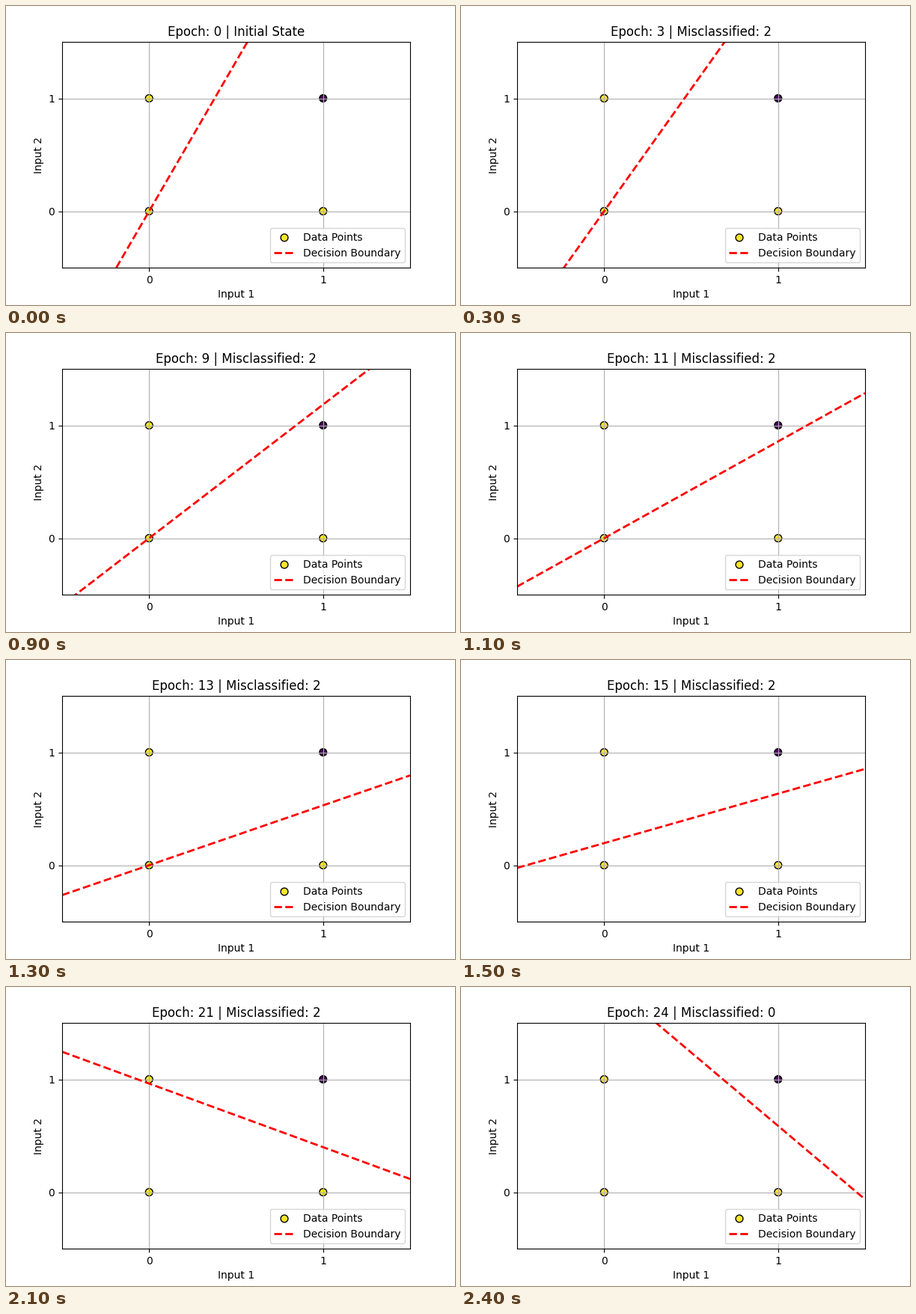
A matplotlib script for the animation above (3000 ms loop, 600 by 400 pixels).

```python
import numpy as np
import matplotlib.pyplot as plt
from matplotlib.animation import FuncAnimation

EPOCHS, HOLD = 24, 5
RATE = 0.1

# NAND truth table
X = np.array([[0, 0], [0, 1], [1, 0], [1, 1]])
Y = np.array([1, 1, 1, 0])


def train():
    """Perceptron learning: (weights, bias, errors) after every epoch."""
    w, b = np.random.RandomState(1).randn(2), 0.0
    history = [(w.copy(), b, None)]
    for _ in range(EPOCHS):
        errors = 0
        for x, target in zip(X, Y):
            delta = target - int(w @ x + b >= 0)
            if delta:
                w += RATE * delta * x
                b += RATE * delta
                errors += 1
        history.append((w.copy(), b, errors))
    return history


history = train()
span = np.array([-0.5, 1.5])

fig, ax = plt.subplots(figsize=(6, 4), dpi=100)
fig.subplots_adjust(left=0.125, right=0.9, bottom=0.125, top=0.88)
ax.scatter(X[:, 0], X[:, 1], c=Y, cmap="viridis", s=50, edgecolors="k",
           linewidths=1, label="Data Points")
boundary, = ax.plot([], [], "r--", lw=2, label="Decision Boundary")
ax.set(xlim=span, ylim=span, xticks=[0, 1], yticks=[0, 1],
       xlabel="Input 1", ylabel="Input 2")
ax.grid(True)
ax.legend(loc="lower right")
title = ax.set_title("")


def update(frame):
    epoch = min(frame, EPOCHS)
    w, b, errors = history[epoch]
    boundary.set_data(span, -(w[0] * span + b) / w[1])
    status = "Initial State" if errors is None else f"Misclassified: {errors}"
    title.set_text(f"Epoch: {epoch} | {status}")
    return boundary, title


anim = FuncAnimation(fig, update, frames=EPOCHS + 1 + HOLD, interval=100,
                     repeat=True, repeat_delay=0)
plt.show()
```
